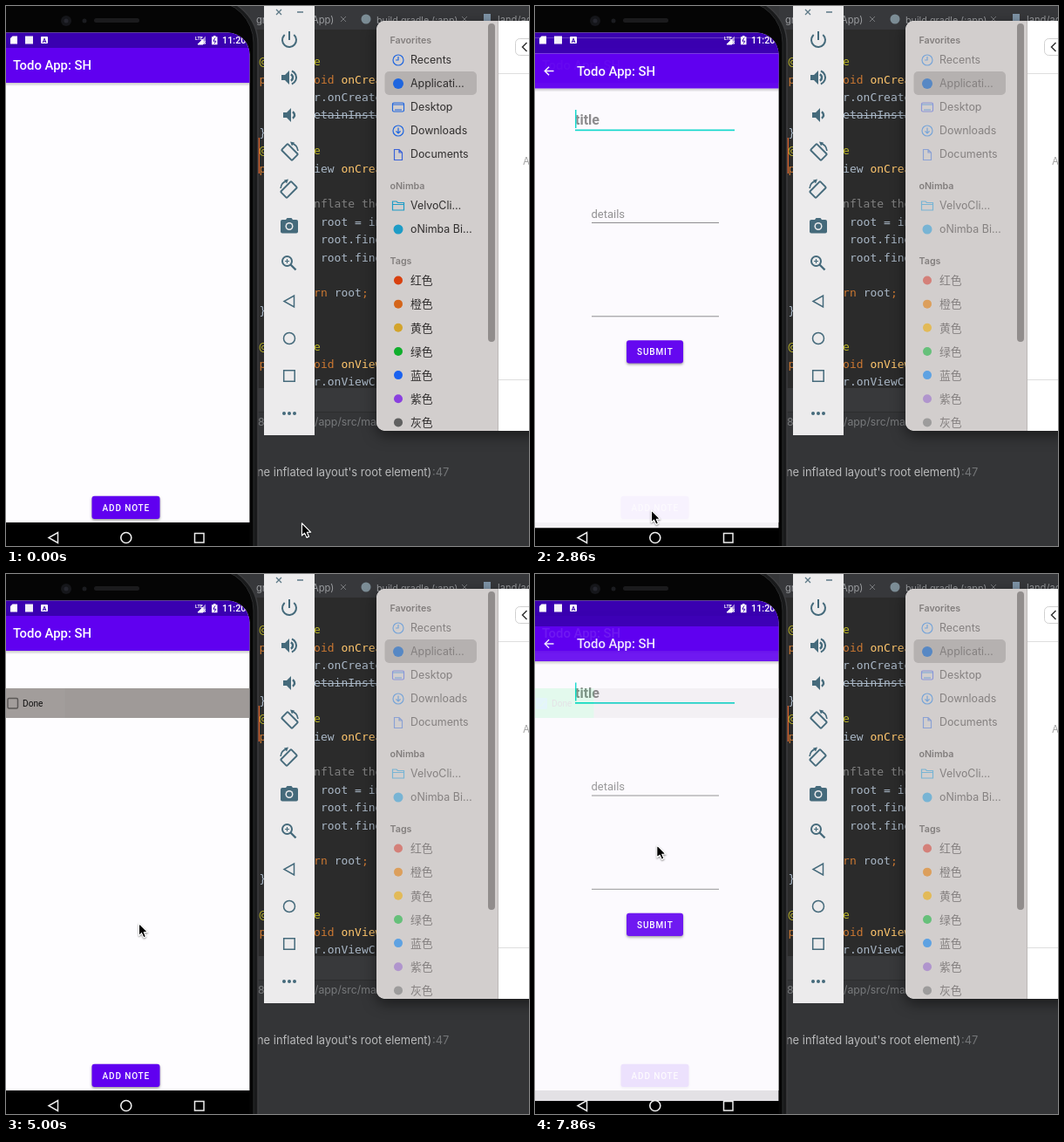
Write an HTML page with a canvas that moves like this. It is 600 by 619 pixels and loops after 8 s.

```html
<!DOCTYPE html>
<html lang="en">
<head>
<meta charset="utf-8">
<title>Todo app demo</title>
<style>
html, body { margin: 0; width: 100%; height: 100%; overflow: hidden; background: #343537; }
canvas { display: block; width: 600px; height: 619px; }
</style>
</head>
<body>
<canvas id="stage" width="600" height="619"></canvas>
<script>
const stage = document.getElementById('stage');
const layer = Object.assign(document.createElement('canvas'), { width: 600, height: 619 });
let ctx = stage.getContext('2d');
const LOOP = 8000, FPS = 7;
const UI = 'Inter, sans-serif', DROID = 'Roboto, sans-serif';
const MONO = '"DejaVu Sans Mono", monospace', CJK = '"Noto Sans CJK SC", "Noto Sans CJK", sans-serif';
const PURPLE = '#6000f0', DARK = '#3a00b0', TEAL = '#0fd8cc', SLATE = '#456a7b';

// ---- helpers ----
function rect(x, y, w, h, fill) {
  ctx.fillStyle = fill;
  ctx.fillRect(x, y, w, h);
}
function paint(fill, stroke, lw = 1) {
  if (fill) { ctx.fillStyle = fill; ctx.fill(); }
  if (stroke) { ctx.strokeStyle = stroke; ctx.lineWidth = lw; ctx.stroke(); }
}
function round(x, y, w, h, r, fill, stroke, lw) {
  ctx.beginPath();
  ctx.roundRect(x, y, w, h, r);
  paint(fill, stroke, lw);
}
function arc(x, y, r, a, b, stroke, lw) {
  ctx.beginPath();
  ctx.arc(x, y, r, a, b);
  paint(null, stroke, lw);
}
function disc(x, y, r, fill, stroke, lw) {
  ctx.beginPath();
  ctx.arc(x, y, r, 0, 7);
  paint(fill, stroke, lw);
}
function path(d, fill, stroke, lw = 1) {
  const p = new Path2D(d);
  if (fill) { ctx.fillStyle = fill; ctx.fill(p); }
  if (stroke) { ctx.strokeStyle = stroke; ctx.lineWidth = lw; ctx.stroke(p); }
}
function text(s, x, y, font, fill, spacing = 0) {
  ctx.font = font;
  ctx.fillStyle = fill;
  ctx.letterSpacing = spacing + 'px';
  ctx.fillText(s, x, y);
}
function at(x, y, draw, angle = 0) {
  ctx.save();
  ctx.translate(x, y);
  ctx.rotate(angle);
  draw();
  ctx.restore();
}
function shadow(color, blur, dy, draw) {
  ctx.save();
  ctx.shadowColor = color;
  ctx.shadowBlur = blur;
  ctx.shadowOffsetY = dy;
  draw();
  ctx.restore();
}
// Draws a group on its own layer, then blends it in as one picture.
function fade(alpha, draw) {
  const base = ctx;
  ctx = layer.getContext('2d');
  ctx.clearRect(0, 0, 600, 619);
  draw();
  ctx = base;
  ctx.save();
  ctx.globalAlpha = alpha;
  ctx.drawImage(layer, 0, 0);
  ctx.restore();
}

// ---- code editor ----
const INK = { k: '#cc7832', a: '#bbb529', m: '#ffc66d', t: '#a9b7c6', c: '#808080' };
const CHAR = 7.83;
const CODE = [
  'a@Override', 'kpublic void |monCreate(', 't    super.onCreate(', 't    setRetainInstance(', 't}',
  'a@Override', 'kpublic |tView |monCreateView(', '', 'c    // Inflate the layout', 't    View root = inflater',
  't    text root.findView', 't    list root.findView', '', 'k    return |troot|k;', 't}', '',
  'a@Override', 'kpublic void |monViewCreated(', 't    super.onViewCreated('
];
function editor() {
  rect(0, 0, 600, 619, '#343537');
  rect(280, 0, 320, 27, '#37383b');
  rect(280, 27, 320, 411, '#2b2b2b');
  rect(280, 438, 320, 27, '#38393b');
  rect(280, 465, 320, 1, '#2c2d2e');
  const tab = '11.2px ' + UI, grey = '#9a9c9f';
  text('gr', 287, 20, tab, grey);
  text('App)', 351, 20, tab, grey);
  text('build.gradle (:app)', 425, 20, '10.8px ' + UI, grey);
  text('land/ac', 564, 20, tab, grey);
  path('M384 12l6 6m0-6l-6 6M523 12l6 6m0-6l-6 6', null, '#77797c');
  disc(413, 15, 5.5, '#7c8d96');
  rect(548, 9, 8, 8, '#7f95a8');
  CODE.forEach((line, i) => {
    let x = 290.5;
    const y = 68.3 + i * 20.39;
    for (const part of line.split('|')) {
      const s = part.slice(1);
      text(s, x, y, '13px ' + MONO, INK[part[0]]);
      x += s.length * CHAR;
    }
  });
  rect(322, 125, 110, 1, INK.t);
  rect(288, 151, 3, 41, '#d9622b');
  text('8/', 289, 481, '12.3px ' + UI, '#77797b');
  text('/app/src/main', 354, 481, '12.3px ' + UI, '#77797b');
  text("ne inflated layout's root element)", 288, 539, '12.9px ' + UI, '#b9babb');
  text(':47', 489, 539, '12.9px ' + UI, '#737577');
}

// ---- file window ----
const PLACES = [['Recents', 62], ['Applicati…', 89], ['Desktop', 116], ['Downloads', 143],
  ['Documents', 170], ['VelvoCli…', 229], ['oNimba Bi…', 256]];
const TAGS = [['红', '#d8400f', '#d48079'], ['橙', '#d4651a', '#dc9f5c'], ['黄', '#d3a42c', '#e2ba58'],
  ['绿', '#10ae2c', '#66c07a'], ['蓝', '#1a62f0', '#5ea2e2'], ['紫', '#8a40df', '#b095cd'], ['灰', '#606060', '#9d9c9c']];
function files(active) {
  shadow('rgba(0,0,0,.5)', 16, 5, () => round(425, 17, 200, 470, 10, '#fff'));
  ctx.save();
  ctx.beginPath();
  ctx.roundRect(425, 17, 200, 470, 10);
  ctx.clip();
  rect(425, 17, 140, 470, '#d2cecd');
  rect(564, 17, 1, 470, '#bdb9b8');
  rect(565, 77, 35, 1, '#dedede');
  rect(565, 428, 35, 1, '#dedede');
  round(584.5, 37.5, 30, 19, 5, '#fff', '#d0d0d0');
  path('M597.5 42l-5 5 5 5', null, '#333', 1.5);
  text('A', 593, 182, '11.5px ' + UI, '#a2a2a2');
  round(434.5, 75, 105.5, 27, 5, '#b5b1b0');
  round(553, 20, 8, 365, 4, '#918d8c');

  const head = '600 10.7px ' + UI;
  text('Favorites', 440.5, 43, head, '#827e7d');
  text('oNimba', 440.5, 210, head, '#827e7d');
  text('Tags', 440.5, 296, head, '#827e7d');
  const ink = active ? '#302e2e' : '#858180';
  for (const [s, y] of PLACES) text(s, 464, y + 4.3, '12.4px ' + UI, ink);
  TAGS.forEach(([s, on, off], i) => {
    const y = 314.5 + i * 27.15;
    disc(450, y, 5, active ? on : off);
    text(s + '色', 464, y + 4.7, '12.8px ' + CJK, ink);
  });

  const blue = active ? '#1f66df' : '#78a5d8', cyan = active ? '#1e9cc6' : '#78b4d4';
  disc(450, 62, 6, null, blue, 1.2);
  path('M450 58v4h-3', null, blue, 1.2);
  disc(450, 89, 6, active ? blue : '#5788c4');
  round(443.5, 111, 13, 10, 1.5, null, active ? blue : '#8b96d8', 1.2);
  path('M444 113h12M446 119h8', null, blue, 1.2);
  disc(450, 143, 6, null, blue, 1.2);
  path('M450 139.5v6.5m-2.6-2.6l2.6 2.6 2.6-2.6', null, blue, 1.2);
  path('M445.5 164.5h5.5l3.5 3.5v8.5h-9zM451 164.5v3.5h3.5', null, active ? '#3b63d8' : '#8ba2d4', 1.2);
  path('M443.5 234v-10h4.5l1.5 1.5h7v8.5zM443.5 227.5h13', null, cyan, 1.2);
  disc(450, 256, 5.5, cyan);
  ctx.restore();
}

// ---- emulator toolbar ----
function rotateIcon(y, dir) {
  at(325, y, () => {
    ctx.scale(dir, 1);
    at(0.5, 0.5, () => round(-5, -8.5, 10, 17, 1, null, SLATE, 1.9), -Math.PI / 4);
    arc(0, 0, 10, -1.3, -.1, SLATE, 1.6);
    path('M1-11.5l5 1-3 4z', SLATE);
  });
}
function speaker(x, y) {
  path(`M${x} ${y - 3}h4l5-5v16l-5-5h-4z`, SLATE);
}
function toolbar() {
  rect(296, 0, 58, 492, '#ecebec');
  path('M310 4l6 6m0-6l-6 6M334 7h7', null, '#5c7886', 1.3);
  arc(325, 39, 8, -.85, Math.PI + .85, SLATE, 2);
  path('M325 29v10', null, SLATE, 2);
  speaker(316, 82);
  arc(325, 82, 4, -1.1, 1.1, SLATE, 2.6);
  arc(325, 82, 8, -1.2, 1.2, SLATE, 2);
  speaker(318, 125);
  arc(327, 125, 4, -1.1, 1.1, SLATE, 2.4);
  rotateIcon(167, 1);
  rotateIcon(210, -1);
  path('M319 245h2l1.5-2h5l1.5 2h2z', SLATE);
  round(315, 245, 20, 15.5, 2, SLATE);
  disc(325, 252.5, 4.5, '#ecebec');
  disc(325, 252.5, 3, SLATE);
  disc(322.5, 292.5, 5.5, null, SLATE, 2);
  path('M326.5 296.5l6 6', null, SLATE, 2.4);
  path('M320 292.5h5M322.5 290v5', null, SLATE, 1.2);
  path('M330.5 332v13l-11.5-6.5z', null, SLATE, 1.5);
  disc(325, 381, 6.5, null, SLATE, 1.5);
  path('M318.7 417.7h12.5v12.5h-12.5z', null, SLATE, 1.5);
  for (const x of [319, 325, 331]) disc(x, 467, 2, SLATE);
}

// ---- phone ----
function button(label, x, y, w, pressed) {
  shadow('rgba(0,0,0,.4)', 3, 1.5, () => round(x, y, w, 26.4, 3, pressed ? '#9742f6' : PURPLE));
  text(label, x + 12, y + 17.2, '500 10px ' + DROID, '#fff', .87);
}
function page(bg, titleX) {
  rect(-5, 30, 285, 562, bg);
  rect(-5, 592, 285, 60, '#000');
  const g = ctx.createLinearGradient(0, 88, 0, 92);
  g.addColorStop(0, 'rgba(0,0,0,.22)');
  g.addColorStop(1, 'rgba(0,0,0,0)');
  rect(-5, 88, 285, 4, g);
  rect(-5, 30, 285, 18, DARK);
  rect(-5, 48, 285, 40, PURPLE);
  text('Todo App: SH', titleX, 73.3, '500 14.9px ' + DROID, '#fff');
}
function listPage({ row, done, press }) {
  page('#fefdff', 8);
  if (row) {
    rect(-5, 131, 285, 34, '#9f9a98');
    rect(-5, 131, 72.5, 34, done ? '#00f456' : '#a29d9b');
    if (done) {
      round(1, 142, 13, 13, 1.5, '#10cbd8');
      path('M3.5 148.5l3 3 5-6', null, '#18e889', 1.4);
    } else {
      round(2, 142.5, 11.5, 11.5, 1.5, null, '#5a5756', 1.5);
    }
    text('Done', 19, 152, '10.2px ' + DROID, '#111');
  }
  button('ADD NOTE', 98.5, 561.7, 78, press);
}
function formPage({ shift, caret, press }) {
  at(0, shift, () => {
    page(shift ? '#fcfafe' : '#fefdff', 48);
    path('M21.5 68h-10m4.6-4.8L11.3 68l4.8 4.8', null, '#fff', 1.5);
    text('title', 46, 129.5, 'bold 16px ' + DROID, '#8a898b');
    rect(46, 135, 183, 1.7, TEAL);
    if (caret) rect(46, 112.5, 1.5, 21, TEAL);
    text('details', 64.5, 236.3, '13px ' + DROID, '#8e8d8f');
    rect(65, 241.5, 146, 1, '#8b8a8c');
    rect(65, 348.8, 146, 1, '#8b8a8c');
    button('SUBMIT', 105, 376.7, 65, press);
  });
}
function statusIcons() {
  path('M7.5 34.5h5.5v9h-8v-6.5z', '#fff');
  rect(22, 34.5, 9, 9, '#f2effa');
  round(40, 35, 8, 8, 1, '#fff');
  text('A', 41.7, 42, 'bold 7px ' + DROID, DARK);
  text('LTE', 217, 39, 'bold 5.5px ' + DROID, '#fff');
  path('M229 34.5v9.5h-9.5z', 'rgba(255,255,255,.55)');
  path('M220 44l6-6v6zM226 40l3 3m0-3l-3 3', '#fff', '#fff');
  path('M238 34h2.5v1.2h2v9h-6.5v-9h2z', '#fff');
  path('M240 36.5l-2.2 3.7h3l-1.6 3', null, DARK);
  text('11:20', 248, 43, '500 10.8px ' + DROID, '#fff');
}
function phone(s) {
  round(-60, -9, 349, 700, 52, '#191a1b', '#3c3d3f', 1.5);
  round(-60, -6, 344, 700, 48, '#050505', '#2b2c2d', 1);
  disc(69, 17, 6, '#15161a');
  disc(69, 17, 2.5, '#25262e');
  disc(90, 17, 2.5, '#1b1c20');
  round(101, 14, 52, 5, 2.5, '#1b1b1d');
  ctx.save();
  ctx.beginPath();
  ctx.roundRect(-40, 30.5, 319.4, 640, 25);
  ctx.clip();
  if (!s.form || s.form.alpha < 1) listPage(s.list);
  if (s.form) fade(s.form.alpha, () => formPage(s.form));
  statusIcons();
  path('M59.5 603.5v12l-10.5-6z', null, '#eee', 1.5);
  disc(137.8, 609.5, 6, null, '#eee', 1.6);
  path('M216.5 604.5h10.5v10.5h-10.5z', null, '#eee', 1.5);
  ctx.restore();
}

// ---- pointer: [step, x, y] ----
const TRACK = [[0, 339.5, 593], [7, 130.5, 567], [13, 130.5, 567], [20, 133.5, 578], [25, 134, 436],
  [30, 140.5, 385], [33, 140.5, 385], [35, 152.5, 400.5], [40, 12.5, 145], [44, 12.5, 145],
  [48, 135, 570], [52, 135, 570], [55, 140, 311]];
function pointer(k) {
  let i = 0;
  while (i < TRACK.length - 2 && TRACK[i + 1][0] <= k) i++;
  const [a, ax, ay] = TRACK[i], [b, bx, by] = TRACK[i + 1];
  const u = Math.min(1, (k - a) / (b - a)), e = u * u * (3 - 2 * u);
  at(ax + (bx - ax) * e, ay + (by - ay) * e, () => {
    ctx.lineJoin = 'round';
    shadow('rgba(0,0,0,.35)', 2, 1, () =>
      path('M0 0v14l3.2-2.9 2.3 5.2 2.5-1.1-2.2-5h4.3z', '#000', '#fff', 1.3));
    path('M.5 1.5v11l2.7-2.5 2.5 5.3 1.2-.6-2.3-5.2h3.9z', '#000');
  });
}

// ---- scene state per step ----
const BLUR = 10, OPEN = 20, PRESS = 33, CLOSE = 34, BACK = 35, CHECK = 42, REOPEN = 55;
function state(k) {
  const s = { list: { row: k >= CLOSE, done: k >= CHECK, press: k === 18 || k === 19 || k === 53 || k === 54 } };
  if (k >= OPEN && k < BACK) {
    s.form = {
      shift: k === OPEN ? 6.5 : k === CLOSE ? 14 : 0,
      alpha: k === OPEN ? .97 : k === CLOSE ? .5 : 1,
      caret: (k - OPEN) / FPS % 1 < .5,
      press: k >= PRESS
    };
  } else if (k >= REOPEN) {
    s.form = { shift: 12, alpha: .9, caret: true, press: false };
  }
  return s;
}

function render(now) {
  const k = Math.floor(now % LOOP * FPS / 1000 + .001);
  editor();
  files(k < BLUR);
  phone(state(k));
  toolbar();
  pointer(k);
  requestAnimationFrame(render);
}
requestAnimationFrame(render);
</script>
</body>
</html>
```
